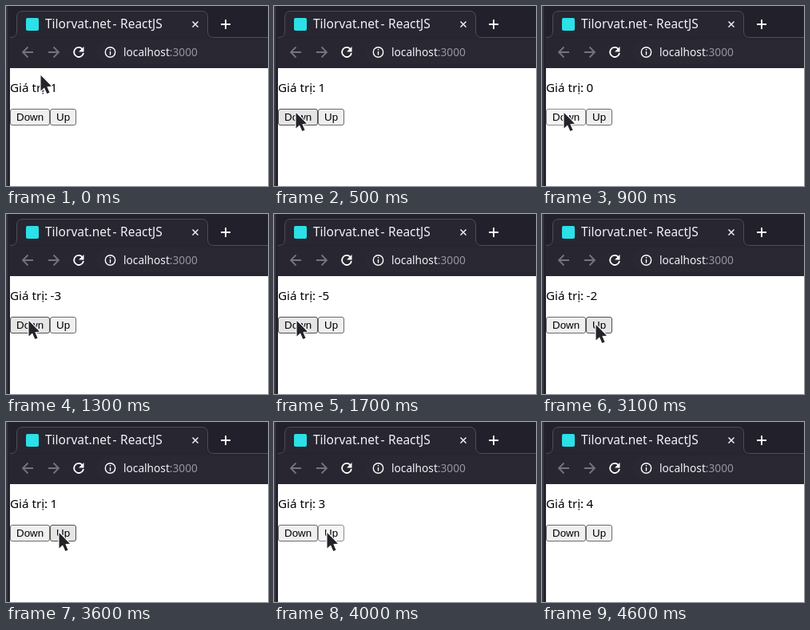
Recreate the animation shown at these times as an HTML page. Size 328 by 226 pixels, loop 5.7 s.

```html
<!DOCTYPE html>
<html lang="vi">
<head>
<meta charset="utf-8">
<title>Counter</title>
<style>
  html, body { margin: 0; width: 100%; height: 100%; overflow: hidden; background: #fff; }
  svg { display: block; width: 328px; height: 226px; font: 15.5px "Noto Sans", "Open Sans", sans-serif; }
  .line { fill: none; stroke: #fff; stroke-width: 1.8; }
  .thin { stroke-width: 1.4; }
  .dim { stroke: #75747d; }
  .page { font-size: 15.2px; }
  .btn rect { stroke-width: 1; fill: #efefef; stroke: #6b6b6b; }
  .btn.hover rect { fill: #e5e5e5; stroke: #4f4f4f; }
  .btn.press rect { fill: #f5f5f5; stroke: #8d8d8d; }
  .btn text { font: 13.333px "Liberation Sans", Arial, sans-serif; }
</style>
</head>
<body>
<svg viewBox="0 0 328 226">
  <!-- window edge and tab strip -->
  <rect width="328" height="226" fill="#fff"/>
  <rect width="328" height="78" fill="#22212b"/>
  <rect width="5" height="226" fill="#25242e"/>
  <rect width="2" height="226" fill="#3a3944"/>
  <rect x="5" y="40" width="323" height="38" fill="#272631"/>
  <path d="M5 39.5H6Q13.5 39.5 13.5 32V14Q13.5 6.5 21 6.5H245Q252.5 6.5 252.5 14V32Q252.5 39.5 260 39.5H329" fill="#272631" stroke="#4d4c57"/>
  <rect x="25" y="15" width="16" height="16" rx="2" fill="#2be0e6"/>
  <g fill="#f2f2f5">
    <text x="49" y="28">Tilorvat.net</text>
    <text x="133.500" y="28">-</text>
    <text x="143" y="28">ReactJS</text>
  </g>
  <path class="line thin" d="M233.500 19.500l7 7m0-7l-7 7"/>
  <path class="line" d="M269 23h12m-6-6v12"/>

  <!-- toolbar -->
  <path class="line dim" d="M34 58H21m6.500-6.500L21 58l6.500 6.500M53 58h13m-6.500-6.500L66 58l-6.500 6.500"/>
  <path class="line" d="M95.600 54A6 6 0 1 0 97 59"/>
  <path d="M97.500 51v6.500H91Z" fill="#fff"/>
  <path d="M328 43H129a15 15 0 0 0 0 30H328Z" fill="#292833"/>
  <circle class="line thin" cx="130.500" cy="58" r="6.200"/>
  <path class="line thin" d="M130.500 57v4.500M130.500 54v1.600"/>
  <text x="147" y="63" font-size="13.7" fill="#f2f2f5">localhost<tspan fill="#96959d">:3000</tspan></text>

  <!-- page -->
  <text class="page" x="5" y="108">Giá trị:</text>
  <text class="page" id="value" x="55.500" y="108"></text>
  <g class="btn" id="down"><rect x="5.500" y="129.500" width="49" height="20" rx="2.500"/><text x="13" y="144">Down</text></g>
  <g class="btn" id="up"><rect x="55.500" y="129.500" width="32" height="20" rx="2.500"/><text x="63" y="144">Up</text></g>
  <path id="cursor" d="M0.500 2V21.500L5 17.500L8.300 25L11.500 23.700L8.300 16.300L14 15.800Z" fill="#24232a" stroke="#fff" stroke-width="2.400" stroke-linejoin="round" paint-order="stroke"/>
</svg>
<script>
const LOOP = 5700, STEP = 100, LEAVE = 4200;
const downs = [800, 1000, 1200, 1300, 1500, 1600, 1900];
const ups = [2600, 2800, 2900, 3100, 3300, 3400, 3600, 3800, 4000, 4100];
// time, x, y of the pointer tip
const path = [
  [0, 43, 85], [100, 43, 85], [400, 27, 132], [1100, 27, 132], [1300, 28, 132],
  [1800, 28, 132], [2100, 88, 142], [2300, 88, 142], [2500, 67, 137],
  [3500, 67, 137], [3600, 66, 137], [LOOP, 66, 137]
];
const [value, down, up, cursor] =
  ["value", "down", "up", "cursor"].map(id => document.getElementById(id));
const count = (clicks, t) => clicks.filter(c => c <= t).length;

function pointerAt(t) {
  const i = path.findIndex(p => p[0] > t);
  const [t0, x0, y0] = path[i - 1], [t1, x1, y1] = path[i];
  const k = (t - t0) / (t1 - t0), ease = k * k * (3 - 2 * k);
  return [x0 + (x1 - x0) * ease, y0 + (y1 - y0) * ease];
}

function setButton(button, over, clicks, t) {
  const pressed = over && clicks.includes(t + STEP);
  button.setAttribute("class", "btn" + (pressed ? " press" : over ? " hover" : ""));
}

function draw(now) {
  const t = Math.floor(now % LOOP / STEP) * STEP;
  const [x, y] = pointerAt(t);
  const shown = t < LEAVE, inRow = shown && y >= 129 && y < 150;
  value.textContent = 1 - count(downs, t) + count(ups, t);
  setButton(down, inRow && x >= 5 && x < 55, downs, t);
  setButton(up, inRow && x >= 55 && x < 88, ups, t);
  cursor.setAttribute("transform", `translate(${x} ${y})`);
  cursor.style.display = shown ? "" : "none";
}

const start = performance.now();
function tick() {
  draw(performance.now() - start);
  requestAnimationFrame(tick);
}
tick();
</script>
</body>
</html>
```
